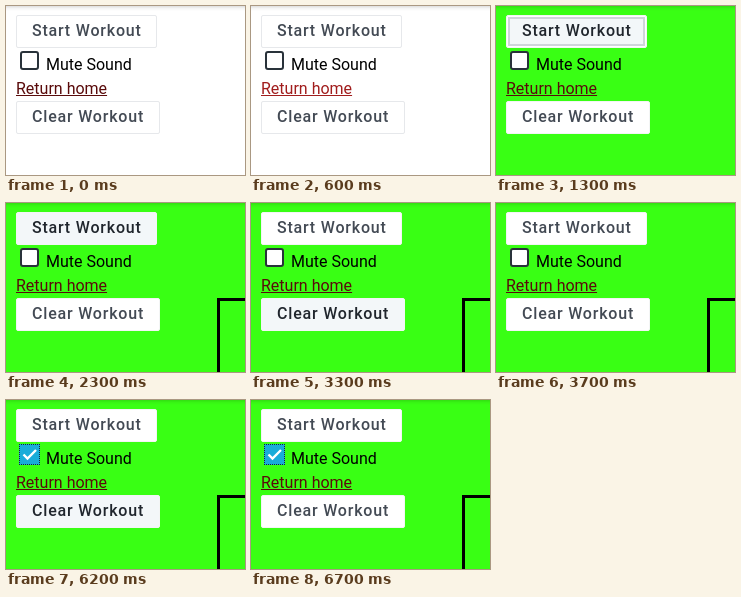
These frames come from a looping animation (239 by 169 pixels, 8 s). An HTML page:

```html
<!DOCTYPE html>
<html lang="en">
<head>
<meta charset="utf-8">
<title>Workout</title>
<style>
html, body { margin: 0; width: 100%; height: 100%; overflow: hidden; }
body { position: relative; background: #fff; font: 16px/19px Roboto, sans-serif; color: #000; }
body.green { background: #39ff14; }
body > * { position: absolute; box-sizing: border-box; white-space: nowrap; }
#shade { left: 0; top: 0; width: 100%; height: 5px; background: linear-gradient(rgba(0,0,0,.13), rgba(0,0,0,.04) 50%, transparent); }
.btn {
  left: 10px; height: 33px; padding: 0 15px; line-height: 29px;
  border: 1px solid #e6e8eb; border-radius: 2px; background: #fff;
  color: #434a54; font-weight: 500; letter-spacing: .8px;
}
.btn.hover { background: #f3f7f9; color: #20262d; border-color: #d3d9dc; }
.green .btn { border-color: #f3f5f5; }
.btn.focus { box-shadow: inset 0 0 0 1px #fff, inset 0 0 0 3px #cfd5da; }
#start { top: 9px; width: 141px; }
#clear { top: 95px; width: 144px; }
#box { left: 14px; top: 45px; width: 19px; height: 19px; border: 2px solid #29323a; border-radius: 3px; background: #fff; }
#box svg { display: none; }
#box.on { left: 13px; top: 44px; width: 21px; height: 21px; border: 1px dotted #172a35; border-radius: 0; background: #19acd9; }
#box.on svg { display: block; }
#mute { left: 40px; top: 49px; }
#link { left: 10px; top: 73px; color: #5a0b0b; text-decoration: underline; }
#link.hover { color: #a11d1d; }
#frame { left: 211px; top: 95px; width: 100px; height: 120px; border: 3px solid #000; }
</style>
</head>
<body>
<div id="shade"></div>
<div id="start" class="btn">Start Workout</div>
<div id="box"><svg width="19" height="19"><path d="M3.5 9.5l4 4 8.5-8.5" fill="none" stroke="#fff" stroke-width="2.4"/></svg></div>
<div id="mute">Mute Sound</div>
<div id="link">Return home</div>
<div id="clear" class="btn">Clear Workout</div>
<div id="frame"></div>
<script>
const LOOP = 8000;
const $ = id => document.getElementById(id);
const [start, clear, link, box, frame] = ['start', 'clear', 'link', 'box', 'frame'].map($);

// Time spans in ms during which each state holds
const states = [
  [document.body, 'green', [[1300, LOOP]]],
  [start, 'hover', [[900, 2900], [4000, 4300]]],
  [start, 'focus', [[1300, 1800]]],
  [clear, 'hover', [[500, 600], [3300, 3400], [6200, 6400]]],
  [link, 'hover', [[600, 700], [3400, 3700], [6400, 6700]]],
  [box, 'on', [[4400, LOOP]]]
];
const within = (t, spans) => spans.some(([a, b]) => t >= a && t < b);

function render(now) {
  const t = now % LOOP;
  for (const [el, name, spans] of states) el.classList.toggle(name, within(t, spans));
  frame.hidden = t < 2300;
  requestAnimationFrame(render);
}
render(performance.now());
</script>
</body>
</html>
```
